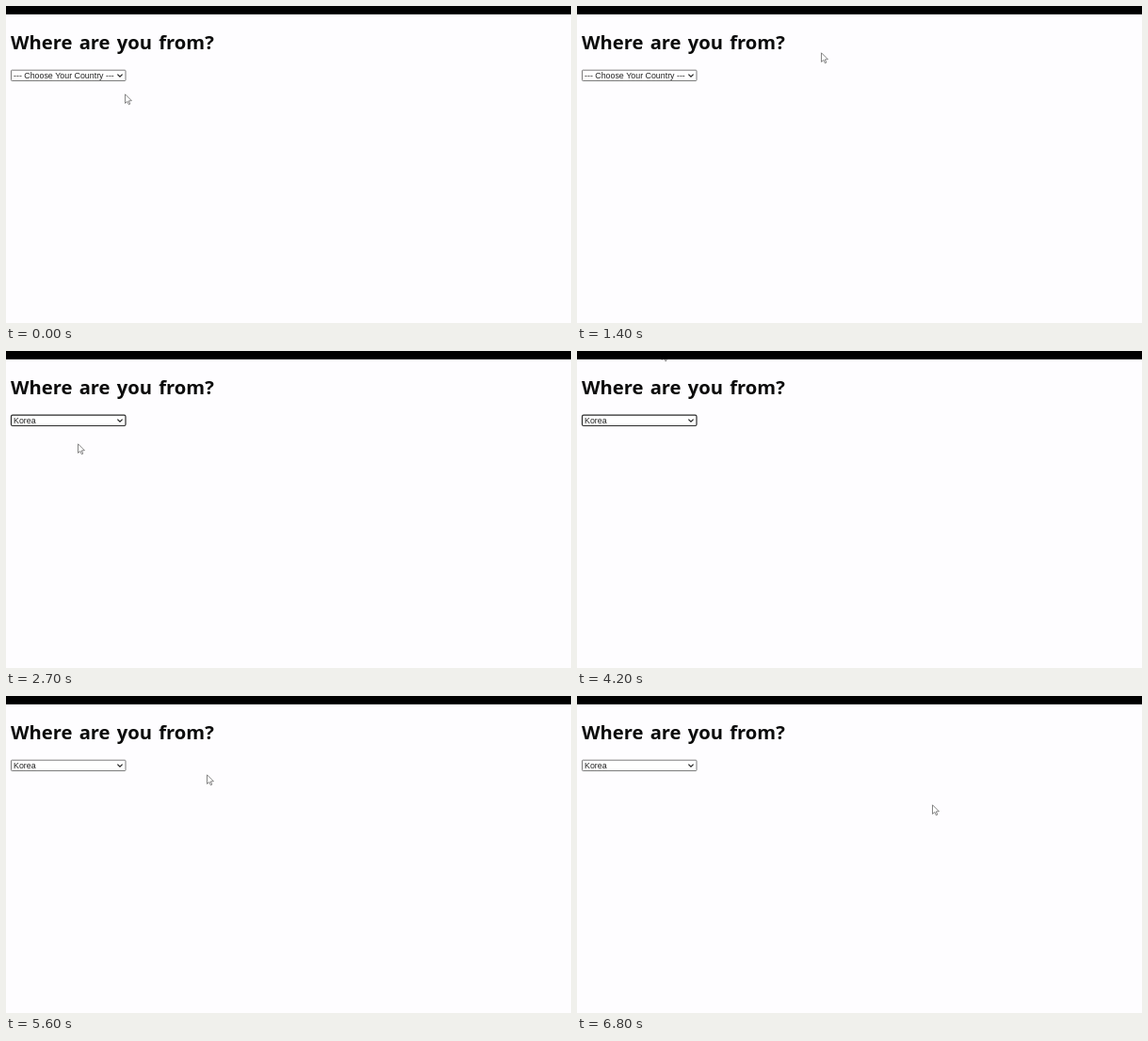
Recreate the animation shown at these times as an HTML page with a canvas. Size 600 px wide and 337 px high, loop 6.9 s.

```html
<!DOCTYPE html>
<html lang="en">
<head>
<meta charset="utf-8">
<title>Country picker</title>
<style>
  html, body { margin: 0; width: 100%; height: 100%; overflow: hidden; background: #fefdff; }
  canvas { display: block; }
</style>
</head>
<body>
<canvas id="stage" width="600" height="337"></canvas>
<script>
const ctx = document.getElementById('stage').getContext('2d');
const LOOP = 6900, STEP = 100;
const PICK = 2700, BLUR = 5300;

// The pointer rests, then travels for `dur` ms and reaches x, y at time `at`.
const move = (at, x, y, dur = STEP) => ({ at, x, y, dur });
const moves = [
  move(0, 126, 93),
  move(700, 206, 42, 700),
  move(1100, 259, 49, 400),
  move(1600, 324, 70, 200),
  move(2100, 112, 77, 500),
  move(PICK, 76, 98),
  move(3000, 88, 48, 300),
  move(3100, 90, -30),
  move(3400, 174, 22),
  move(3500, 89.5, -1),
  move(4800, 208, 52, 600),
  move(5600, 213, 83, 400),
  move(6400, 409, 143, 800),
  move(6800, 377, 115)
];

function pointerAt(t) {
  let { x, y } = moves[0];
  for (const m of moves) {
    const k = Math.min(1, Math.max(0, (t - m.at) / m.dur + 1));
    x += (m.x - x) * k;
    y += (m.y - y) * k;
  }
  return [x, y];
}

function text(str, x, y, font, color) {
  ctx.font = font;
  ctx.fillStyle = color;
  ctx.fillText(str, x, y);
}

function drawTitle() {
  ctx.wordSpacing = '2px';
  text('Where are you from?', 5, 46, 'bold 20.2px "Open Sans", "Noto Sans", sans-serif', '#0b0b0b');
  ctx.wordSpacing = '0px';
}

function drawSelect(t) {
  const chosen = t >= PICK;
  const focused = chosen && t < BLUR;
  const marked = t >= 1700 && t < 2100;

  ctx.beginPath();
  ctx.roundRect(5.5, 68.2, 121.5, 11.3, focused ? 1.5 : 0.8);
  ctx.fillStyle = '#fff';
  ctx.fill();
  ctx.strokeStyle = focused ? '#2a2a2a' : '#7b7b7b';
  ctx.lineWidth = focused ? 1.2 : 1;
  ctx.stroke();

  if (marked) {
    ctx.fillStyle = '#3390ff';
    ctx.fillRect(8, 69, 107, 10);
  }
  const label = chosen ? 'Korea' : '--- Choose Your Country ---';
  text(label, 8, 76.8, '8.85px "Liberation Sans", Arial, sans-serif', marked ? '#fff' : '#222');

  ctx.beginPath();
  ctx.moveTo(118.4, 72.6);
  ctx.lineTo(121, 75.2);
  ctx.lineTo(123.6, 72.6);
  ctx.strokeStyle = '#222';
  ctx.lineWidth = 1.2;
  ctx.stroke();
}

const arrow = new Path2D('M.5 .8V10.4L2.8 8.4 4.4 11.8 5.8 11.1 4.3 7.9 7.4 7.7Z');

function drawPointer(x, y) {
  ctx.save();
  ctx.translate(x, y);
  ctx.fillStyle = '#fff';
  ctx.fill(arrow);
  ctx.strokeStyle = '#666';
  ctx.lineWidth = 0.8;
  ctx.stroke(arrow);
  ctx.restore();
}

function draw(t) {
  ctx.fillStyle = '#fefdff';
  ctx.fillRect(0, 0, 600, 337);
  drawTitle();
  drawSelect(t);
  drawPointer(...pointerAt(t));
  ctx.fillStyle = '#000';
  ctx.fillRect(0, 0, 600, 8.9);
}

const start = performance.now();
function tick() {
  const t = (performance.now() - start) % LOOP;
  draw(Math.floor(t / STEP) * STEP);
  requestAnimationFrame(tick);
}
tick();
</script>
</body>
</html>
```
